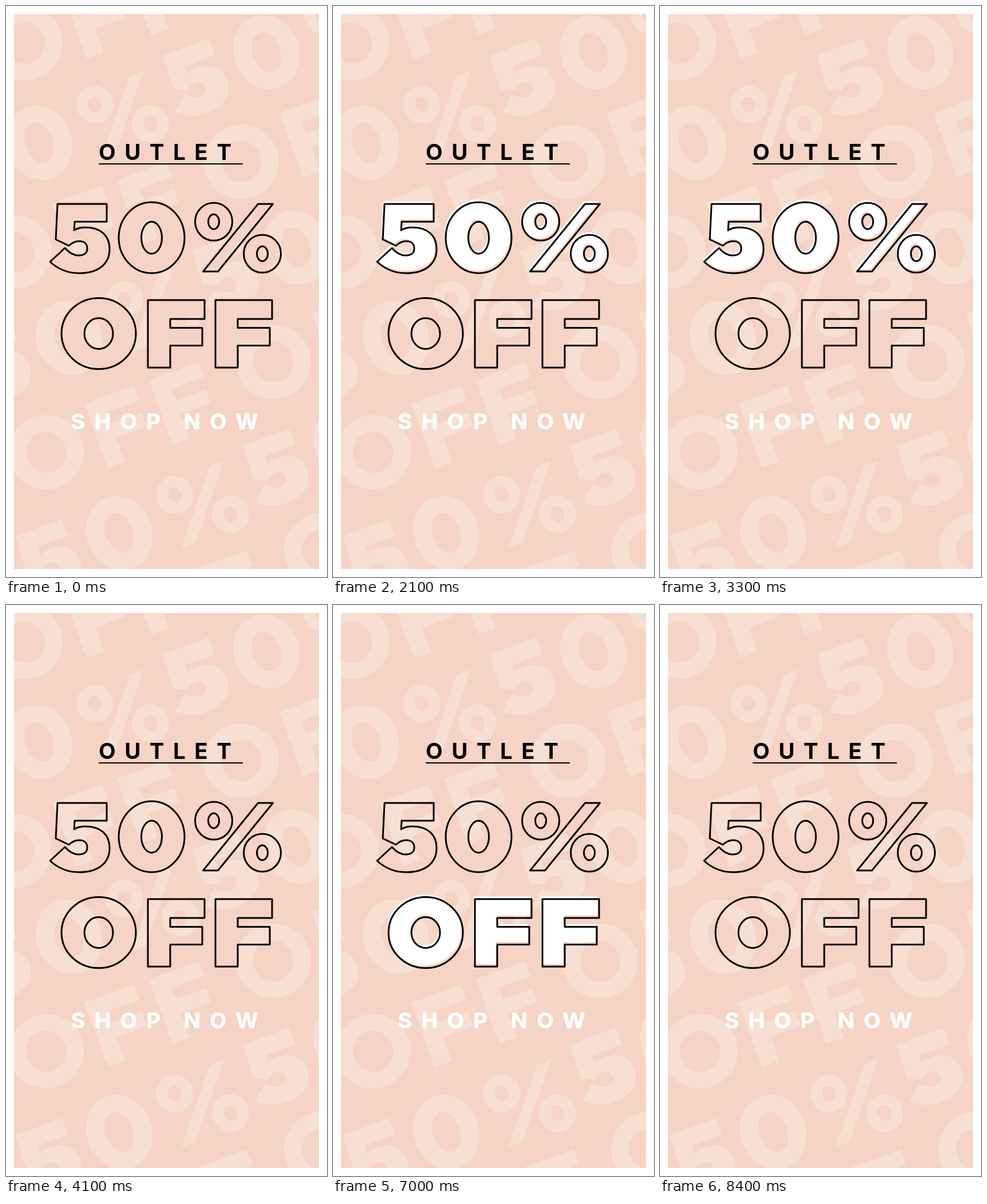
An HTML page for the animation above (8.6 s loop, 561x998 px).

```html
<!DOCTYPE html>
<html lang="en">
<head>
<meta charset="utf-8">
<style>
  html, body { margin: 0; width: 100%; height: 100%; overflow: hidden; background: #fff; }
  svg { display: block; width: 100vw; height: 100vh; }
  text { font: 700 38.5px Inter, Lato, sans-serif; letter-spacing: 15.5px; }
  .call { font-weight: 800; letter-spacing: 16px; fill: #fff; }
  path { fill-rule: evenodd; }
</style>
</head>
<body>
<svg viewBox="0 0 561 998">
  <defs><clipPath id="card"><rect x="14" y="14" width="533" height="970"/></clipPath></defs>
  <rect x="14" y="14" width="533" height="970" fill="#f5d3c5"/>
  <g clip-path="url(#card)"><g id="pattern" fill="#f7dfd3"></g></g>
  <g id="fills" transform="translate(-2.5 -4.5)"></g>
  <g id="outlines" fill="none" stroke="#000" stroke-width="3" stroke-linejoin="round"></g>
  <text x="162" y="269">OUTLET</text>
  <rect x="162" y="275" width="252" height="2"/>
  <text class="call" x="113" y="740">SHOP NOW</text>
</svg>
<script>
const PINK = '#f5d3c5';
const STEP = 200, PASS = 4300;
const byId = id => document.getElementById(id);

// Letter shapes: rings and % are placed by their centre, 5 and F by their top left corner
const oval = (x, y, rx, ry) =>
  `M${x - rx} ${y}a${rx} ${ry} 0 1 1 ${2 * rx} 0a${rx} ${ry} 0 1 1 ${-2 * rx} 0Z`;
const ring = (x, y, rx, ry, holeX, holeY) => oval(x, y, rx, ry) + oval(x, y, holeX, holeY);
const percent = (x, y, dx, dy, holeX, holeY) =>
  ring(x - dx, y - dy, 32.5, 33, holeX, holeY) + ring(x + dx, y + dy, 32.5, 33, holeX, holeY) +
  `M${x + 35} ${y - 59}h26l-96 118h-26Z`;
const five = (x, y) => `M${x} ${y}h86v31h-56l-1 15q7-5 20-5c25 0 42 13 42 38c0 26-20 42-53 42` +
  'c-21 0-37-7-51-20l26-24c7 8 15 13 24 13c10 0 15-5 15-12c0-8-5-13-14-13c-7 0-13 3-18 8l-23-11Z';
const eff = (x, y, w, h, stem, bar) =>
  `M${x} ${y}h${w}v${bar}H${x + stem}V${y + 0.41 * h}H${x + w - 4}v${bar - 2}H${x + stem}V${y + h}H${x}Z`;

function addPath(parent, d, transform = '') {
  const path = document.createElementNS('http://www.w3.org/2000/svg', 'path');
  path.setAttribute('d', d);
  path.setAttribute('transform', transform);
  return byId(parent).appendChild(path);
}

// Headline in reading order
const letters = [
  five(90, 346),
  ring(254.5, 405, 57.5, 62, 18, 28),
  percent(405.5, 405, 42.5, 28, 9.5, 13),
  ring(162, 572.5, 65, 62, 25, 27),
  eff(248, 514, 99, 118, 39, 33),
  eff(366, 514, 99, 118, 39, 33)
];
const fills = letters.map(d => addPath('fills', d));
letters.forEach(d => addPath('outlines', d));

// Tilted background: the two lines alternate and each repeats along its row
const lines = [
  ring(0, 0, 66, 65, 35, 36) + eff(92, -57, 92, 120, 32, 28) + eff(212, -57, 92, 120, 32, 28),
  five(-172, -57) + ring(0, 0, 57, 66, 24, 36) + percent(154, 3, 40, 32.5, 11.5, 14)
];
const rowStarts = [[33, 65], [58, 239], [14, 430], [110, 580], [70, 780], [198, 921], [155, 1109]];
rowStarts.forEach(([x, y], row) => {
  for (let k = -1; k <= 1; k++)
    addPath('pattern', lines[row % 2], `translate(${x + 397 * k} ${y - 158 * k}) rotate(-20)`);
});

function isLit(i, t) {
  if (t < 1700) return t >= STEP * (i + 1);       // one letter after another
  if (t >= 4100) return false;
  const lowerLine = Math.floor((t - 1700) / STEP) % 2 === 1;
  return lowerLine === i > 2;                     // the two lines take turns
}

function draw(time) {
  const unlit = time < 1200 ? PINK : 'none';
  fills.forEach((path, i) => path.setAttribute('fill', isLit(i, time % PASS) ? '#fff' : unlit));
}

const start = performance.now();
function tick() {
  draw((performance.now() - start) % (2 * PASS));
  requestAnimationFrame(tick);
}
tick();
</script>
</body>
</html>
```
